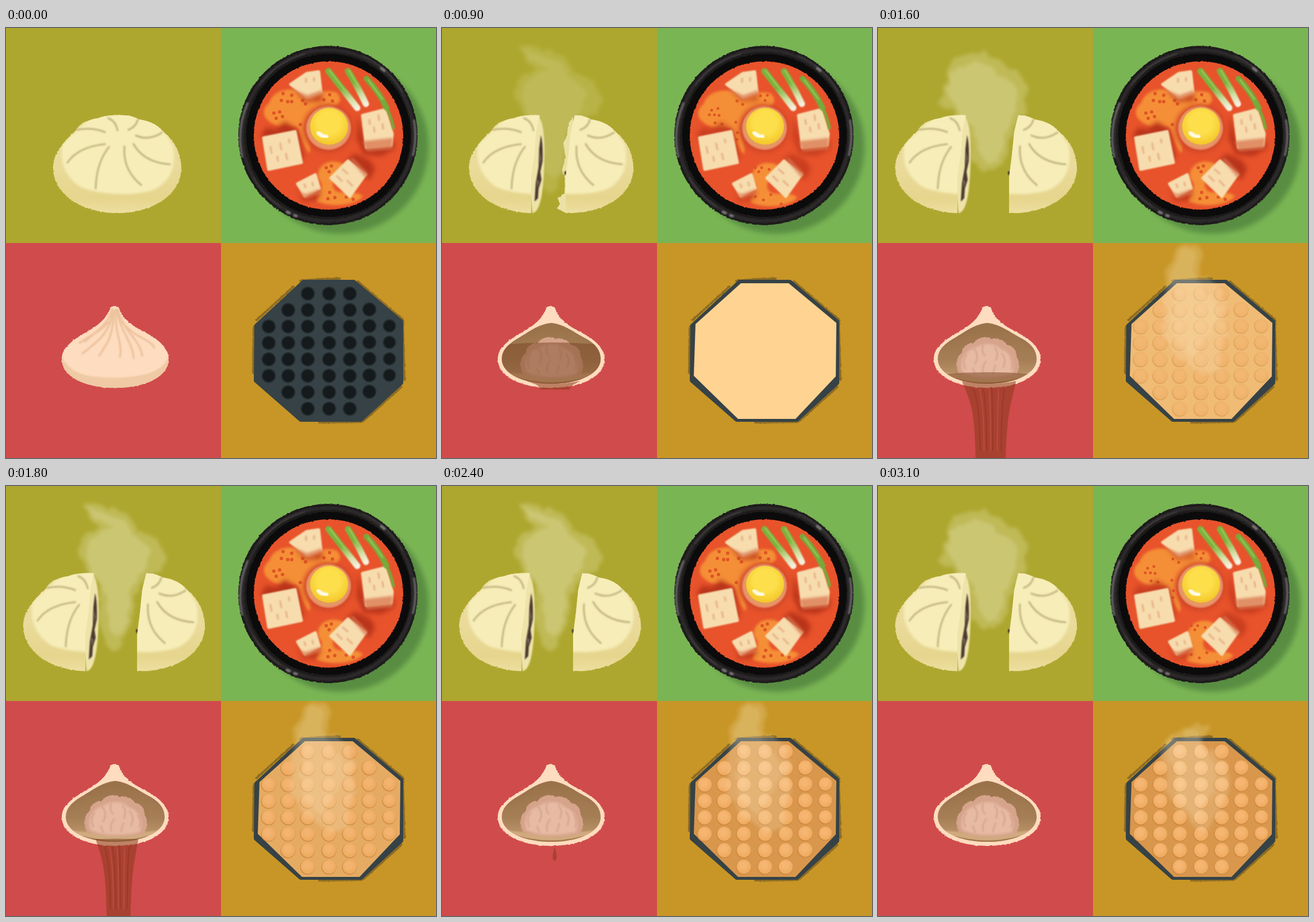
These frames come from a looping animation (748x748 px, 3.2 s). An HTML page:

```html
<!DOCTYPE html>
<html lang="en">
<head>
<meta charset="utf-8">
<title>Four dishes</title>
<style>
html, body { margin: 0; height: 100%; overflow: hidden; }
svg { display: block; width: 100%; height: 100%; }
filter { color-interpolation-filters: sRGB; }
.line { fill: none; stroke-linecap: round; stroke-linejoin: round; }
</style>
</head>
<body>
<svg viewBox="0 0 748 748">
<defs>
  <filter id="rough" x="-10%" y="-10%" width="120%" height="120%">
    <feTurbulence type="fractalNoise" baseFrequency=".25" numOctaves="2" seed="4"/>
    <feDisplacementMap in="SourceGraphic" scale="3" xChannelSelector="R" yChannelSelector="G"/>
    <feGaussianBlur stdDeviation=".6"/>
  </filter>
  <filter id="smoke" x="-20%" y="-20%" width="140%" height="140%">
    <feTurbulence type="fractalNoise" baseFrequency=".05" numOctaves="3" seed="9"/>
    <feDisplacementMap in="SourceGraphic" scale="18" xChannelSelector="R" yChannelSelector="G"/>
    <feGaussianBlur stdDeviation="3"/>
  </filter>
  <filter id="b1" x="-20%" y="-20%" width="140%" height="140%"><feGaussianBlur stdDeviation="1"/></filter>
  <filter id="b2" x="-20%" y="-20%" width="140%" height="140%"><feGaussianBlur stdDeviation="2.2"/></filter>
  <filter id="b4" x="-30%" y="-30%" width="160%" height="160%"><feGaussianBlur stdDeviation="4"/></filter>

  <path id="bunShape" d="M82 243C82 218 100 198 122 178C126 166 148 158 160 157C175 151 195 151 208 152C217 152 226 156 231 159C245 161 262 166 272 179C292 194 305 218 305 243C305 290 255 322 194 322S82 290 82 243Z"/>
  <clipPath id="bunClip"><use href="#bunShape"/></clipPath>
  <clipPath id="leftClip"><path d="M60 130H205V152L199 180 196 220 190 260V330H60Z"/></clipPath>
  <clipPath id="rightClip"><path d="M330 130H203V152L196 180 192 220 187 260V330H330Z"/></clipPath>
  <linearGradient id="bunShade" x1="0" y1="0" x2="0" y2="1">
    <stop offset=".5" stop-color="#eadb9b"/><stop offset=".85" stop-color="#e6d58d"/><stop offset="1" stop-color="#eddfa0"/>
  </linearGradient>
  <g id="bun">
    <use href="#bunShape" fill="url(#bunShade)" filter="url(#rough)"/>
    <g clip-path="url(#bunClip)">
      <path filter="url(#b2)" fill="#f6edb8" d="M98 202C92 240 108 262 130 277C165 291 220 293 255 282C285 270 298 240 290 203L262 160 210 148 150 153Z"/>
      <g class="line" filter="url(#b1)" stroke="#cabe88" stroke-width="3.6">
        <path d="M178 157Q191 162 194 178M124 177Q150 172 172 181M107 234Q125 207 172 202M156 279Q157 235 179 207M206 206Q203 247 235 273M222 202Q240 234 285 237M226 187Q248 197 271 182M213 177Q226 172 229 160"/>
      </g>
    </g>
  </g>

  <path id="cavity" d="M190 513C215 516 230 530 250 540C268 550 276 562 276 576C276 603 235 619 190 619S104 603 104 576C104 562 112 552 130 541C150 530 165 516 190 513Z"/>
  <clipPath id="cavityClip"><use href="#cavity"/></clipPath>
  <linearGradient id="cavityShade" x1="0" y1="0" x2="0" y2="1">
    <stop offset=".1" stop-color="#9c744c"/><stop offset=".6" stop-color="#a57e56"/><stop offset="1" stop-color="#c39c70"/>
  </linearGradient>
  <path id="dumpling" d="M182 486Q189 481 196 486C201 502 216 516 234 525C264 540 283 556 283 575C283 608 240 626 190 626S97 608 97 575C97 556 118 541 143 527C163 516 176 503 182 486Z"/>
  <clipPath id="dumplingClip"><use href="#dumpling"/></clipPath>

  <clipPath id="stewClip"><ellipse cx="561" cy="187" rx="130" ry="129"/></clipPath>
  <linearGradient id="stem" gradientUnits="userSpaceOnUse" x1="580" y1="75" x2="610" y2="140">
    <stop offset=".4" stop-color="#7cb23d"/><stop offset=".75" stop-color="#d3dfa4"/><stop offset="1" stop-color="#f7f0df"/>
  </linearGradient>
  <radialGradient id="yolk" cx=".5" cy=".4" r=".6">
    <stop offset=".5" stop-color="#fddf4b"/><stop offset="1" stop-color="#f4c728"/>
  </radialGradient>
  <radialGradient id="ballShade" cx=".45" cy=".4">
    <stop offset=".4" stop-color="#f5b672"/><stop offset="1" stop-color="#f0ac62"/>
  </radialGradient>
</defs>

<path fill="#aea72f" d="M0 0h375v375H0z"/>
<path fill="#7ab554" d="M374 0h374v375H374z"/>
<path fill="#d04b4c" d="M0 374h375v374H0z"/>
<path fill="#c89626" d="M374 374h374v374H374z"/>

<!-- Steamed bun -->
<g id="bunSteam" fill="#e6e4b4" filter="url(#smoke)">
  <g id="steamA">
    <path opacity=".3" d="M120 85C118 62 140 42 165 42C190 36 212 55 222 70C255 75 268 100 256 122C268 150 235 165 232 185C235 215 218 240 192 248C165 252 155 225 160 190C140 175 138 155 128 140C105 142 96 125 110 112C120 105 116 95 120 85Z"/>
    <path opacity=".3" d="M122 85C135 55 190 50 207 80C240 85 250 120 238 145C215 180 225 210 205 232C180 240 164 205 170 180C150 160 115 125 122 85Z"/>
  </g>
  <g id="steamB">
    <path opacity=".3" d="M138 32C155 25 165 42 190 40C212 45 220 60 226 78C258 80 282 105 276 130C270 152 238 155 228 180C222 205 226 230 210 250C205 270 202 285 190 287C172 285 172 265 166 250C155 225 165 200 162 175C145 152 126 130 128 105C130 85 150 75 165 70C150 62 138 52 138 32Z"/>
    <path opacity=".3" d="M142 36C165 46 195 45 208 66C218 85 252 100 250 125C245 152 212 165 215 190C220 215 205 245 192 265C176 245 172 220 176 190C155 160 132 125 142 100C155 85 175 85 182 72C165 62 148 55 142 36Z"/>
  </g>
</g>
<use id="whole" href="#bun"/>
<g id="left">
  <g filter="url(#b1)">
    <path fill="#eee3a9" d="M200 152C213 158 214 200 213 232C212 280 207 321 192 322L186 260 192 180Z"/>
    <path fill="#4b3a30" d="M207 186Q211 200 210 232L206 250 208 264 203 280 202 296 196 302 198 270 203 242 204 210Z"/>
    <path fill="#7b695a" d="M205 215l3 12-2 12zM200 264l4 3-3 12z"/>
  </g>
  <use href="#bun" clip-path="url(#leftClip)"/>
</g>
<g id="right">
  <path id="tear" fill="#ece1a5" filter="url(#rough)" d="M200 154Q188 170 190 188L183 200 187 225 181 246 186 262 185 288 173 296 177 306 172 314 188 322H200Z"/>
  <path fill="#4b3a30" filter="url(#b1)" d="M185 249l7 1-1 7-6-2z"/>
  <use href="#bun" clip-path="url(#rightClip)"/>
</g>

<!-- Stew -->
<ellipse cx="582" cy="206" rx="153" ry="152" fill="#4d7f3c" opacity=".72" filter="url(#b4)"/>
<g filter="url(#rough)">
  <ellipse cx="560" cy="187" rx="156" ry="156" fill="#1e1b1b"/>
  <ellipse cx="560" cy="187" rx="149" ry="149" fill="none" stroke="#2b2829" stroke-width="6"/>
  <ellipse cx="561" cy="187" rx="136" ry="135" fill="none" stroke="#0c0b0b" stroke-width="14"/>
  <ellipse cx="561" cy="187" rx="130" ry="129" fill="#e8532b"/>
</g>
<g class="line" filter="url(#b1)" stroke="#777476">
  <path stroke-width="4" opacity=".75" d="M411 224A151 151 0 0 1 420 131M710 161A151 151 0 0 1 708 221"/>
  <path stroke-width="5" d="M489 320l4 2M502 326l3 1M653 70l5 4"/>
  <path stroke-width="2" opacity=".3" d="M440 100A148 148 0 0 1 520 45M620 48A148 148 0 0 1 690 112M430 260A148 148 0 0 0 478 311"/>
</g>
<g clip-path="url(#stewClip)">
  <g id="foam" fill="#f58f37" filter="url(#b2)">
    <path d="M458 130C465 108 490 104 510 108C528 125 545 104 575 112C588 125 578 138 560 138C535 140 525 152 524 178C525 195 532 205 528 218C516 206 512 180 505 172C485 170 470 175 455 160C446 152 446 140 458 130Z"/>
    <path d="M552 238C562 229 590 231 590 244C575 258 560 270 574 284C595 290 610 282 621 293C606 310 565 312 541 302C535 290 552 286 549 270C540 260 540 248 552 238Z"/>
  </g>
  <g class="line" stroke="#df5525" stroke-width="6">
    <path id="dotsA" d="M482 114h0M490 128h0M479 126h0M497 117h0M466 148h0M476 146h0M481 154h0M470 157h0M497 128h0M516 126h0M521 132h0M553 125h0M563 116h0M568 127h0M512 168h0M557 243h0M566 240h0M562 250h0M563 286h0M572 295h0M560 297h0M592 294h0M604 298h0"/>
    <path id="dotsB" stroke-width="5" d="M469 143h0M480 140h0M465 151h0M482 152h0M474 151h0M475 165h0M487 167h0M513 127h0M523 133h0M554 118h0M566 117h0M562 126h0M511 164h0M514 182h0M513 194h0M545 243h0M556 243h0M551 250h0M569 246h0M545 293h0M559 299h0M572 290h0M590 306h0"/>
  </g>
  <g id="shadows" fill="#b9341a" filter="url(#b4)">
    <path d="M443 188L452 173 470 176 485 163 508 178 518 226 506 234 500 186 450 196Z"/>
    <path d="M498 102l28 22 24-9-1 11-28 2z"/>
    <path d="M612 152l-2 40 12 28 30 3 24-13-2-16-48 10z"/>
    <path d="M592 232l14-14 28 13 8 14-10 20z"/>
    <path d="M505 272l12 24 32-12-8 15-26 2z"/>
  </g>
  <ellipse cx="560" cy="175" rx="43" ry="42" fill="#cf4526" filter="url(#b4)"/>
  <g filter="url(#b1)" fill="#f7dcae" stroke="#f7dcae" stroke-linejoin="round" stroke-width="5">
    <path d="M495 98L523 79 544 76 548 111 524 120Z"/>
    <path d="M448 191L503 180 514 234 457 246Z"/>
    <path d="M620 152L659 142 672 184 670 204 627 208Z"/>
    <path d="M565 261L595 231 625 255 598 293Z"/>
    <path d="M507 271L538 255 545 279 520 292Z"/>
  </g>
  <path fill="#d9764e" opacity=".75" filter="url(#b2)" d="M494 104L524 117 550 108V116L524 126ZM621 197L673 191 672 211 627 215ZM598 228l6-2 26 27-4 8zM509 284l12 5 25-9 1 8-26 9z"/>
  <path class="line" filter="url(#b1)" stroke="#e8b68a" stroke-width="3.5" d="M522 88v6M536 87v5M460 207l2 10M477 201l2 10M492 194l1 5M487 219l2 9M472 224l1 7M632 160l1 7M648 152l1 8M655 167l1 8M640 173l1 7M586 246l8 7M576 258l8 8M594 266l8 8M519 272l2 5M533 269l1 5"/>
  <g class="line" stroke="url(#stem)" stroke-width="11" filter="url(#b1)">
    <path d="M561 75Q582 102 611 139"/><path d="M595 75Q612 102 626 132"/>
    <path stroke="#74ab3a" stroke-width="10" d="M627 88Q647 108 662 139"/>
    <path stroke="#74ab3a" stroke-width="5" d="M660 136Q670 152 674 174"/>
    <path stroke="#a7cf66" stroke-width="2" d="M563 74L590 109M597 74L612 100M630 90L655 124"/>
  </g>
  <ellipse cx="561" cy="174" rx="39" ry="38" fill="#e9906a" filter="url(#b1)"/>
  <ellipse cx="561" cy="173" rx="36" ry="35" fill="#e59a62" filter="url(#b1)"/>
  <ellipse cx="562" cy="171" rx="33" ry="32" fill="url(#yolk)"/>
  <path class="line" filter="url(#b1)" stroke="#fffbe4" stroke-width="7" d="M543 182Q549 189 558 189"/>
</g>

<!-- Soup dumpling -->
<use href="#dumpling" fill="#fedcbf" filter="url(#rough)"/>
<g id="skin" clip-path="url(#dumplingClip)">
  <path fill="#efcaa4" filter="url(#b1)" d="M97 570Q108 600 150 606Q195 612 240 603Q272 596 283 572V630H97Z"/>
  <g class="line" filter="url(#b1)" stroke="#edc39e" stroke-width="3.5">
    <path d="M184 490C178 518 155 528 138 545M186 490C182 530 160 545 133 566M187 492C187 535 176 550 162 570M191 490C188 530 204 550 198 572M193 490C197 525 220 545 222 574M195 490C202 525 232 540 237 570M202 512C225 540 250 540 258 556M178 512C168 525 150 533 128 548"/>
  </g>
</g>
<g id="inside">
  <use href="#cavity" fill="url(#cavityShade)"/>
  <g clip-path="url(#cavityClip)">
    <path fill="#8f6944" opacity=".45" filter="url(#b4)" d="M104 560Q145 520 190 517Q235 520 276 560V548L190 510Z"/>
    <path fill="#d0aa7e" filter="url(#b1)" d="M106 598Q190 610 274 598V622H106Z"/>
    <path fill="#d6a38b" filter="url(#rough)" d="M140 600C132 585 138 570 146 565C146 553 158 547 166 549C172 538 190 534 198 541C208 537 220 543 224 551C236 553 242 562 241 572C248 582 246 598 238 605C215 612 160 612 140 600Z"/>
    <path fill="#e7baa3" filter="url(#b2)" d="M147 598C140 580 152 560 168 557C184 546 205 548 214 559C232 564 240 585 233 602C205 609 165 609 147 598Z"/>
    <path class="line" stroke="#d5a58e" stroke-width="2.5" filter="url(#b1)" d="M154 568q-8 12-2 25M167 558q10 10 2 26M183 552q-4 12 3 18M188 580q-8 9-5 20M203 556q8 10 2 22M215 566q9 10 3 24M230 573q6 10 2 20M165 592l4 10M204 587l-4 14"/>
    <path fill="none" stroke="#a3774d" stroke-width="3" d="M132 610Q190 626 248 610"/>
  </g>
</g>
<g clip-path="url(#cavityClip)"><path id="broth" fill="#7b4526"/></g>
<path id="stream" fill="#8a3a1c" fill-opacity=".55"/>
<path id="dark" class="line" stroke="#86301f" stroke-width="2.5" opacity=".35"/>
<path id="pale" class="line" stroke="#c95a48" stroke-width="2" opacity=".5"/>

<!-- Griddle -->
<path class="line" stroke="#5d4b24" stroke-width="4" opacity=".55" filter="url(#rough)" d="M512 440L545 437 580 436M612 441L690 507 693 612M688 624L620 685 545 686M431 520L430 600M436 508L500 450"/>
<path fill="#364246" stroke="#364246" stroke-width="8" stroke-linejoin="round" d="M518 442L605 442 687 511 687 617 617 681 513 681 435 613 436 518Z"/>
<g id="holes"></g>
<g id="batter">
  <path id="dough" d="M520 444L603 444 686 513 685 606 615 680 515 680 438 605 441 515Z"/>
  <g id="balls"></g>
</g>
<g id="griddleSteam" fill="#fff0d2" filter="url(#smoke)">
  <g id="puffA">
    <path opacity=".2" d="M515 392C525 370 560 370 567 392C568 410 555 418 562 430C590 440 615 470 603 505C608 540 590 560 595 590C575 612 540 592 525 575C500 555 490 530 497 500C490 470 510 455 500 430C500 410 513 405 515 392Z"/>
    <path opacity=".15" d="M527 388C545 375 560 395 545 415C540 440 590 455 592 495C585 530 560 540 550 570C520 560 505 520 515 485C520 455 505 435 512 418Z"/>
  </g>
  <g id="puffB">
    <path opacity=".2" d="M528 424C545 418 560 416 578 417C572 438 560 440 566 452C595 462 618 490 607 525C605 550 585 570 580 590C560 610 545 590 535 570C510 560 492 535 503 505C492 480 488 450 505 440C515 440 520 430 528 424Z"/>
    <path opacity=".15" d="M500 448C520 435 540 440 535 425C555 420 570 425 560 445C585 470 595 500 585 525C575 555 560 560 555 580C530 560 515 540 520 510C515 485 500 470 500 448Z"/>
  </g>
</g>
</svg>
<script>
const $ = id => document.getElementById(id);
const clamp = v => Math.max(0, Math.min(1, v));
const fade = (id, v) => $(id).setAttribute('opacity', clamp(v));
const draw = (id, d) => $(id).setAttribute('d', d);

const cols = [457, 491, 525, 562, 598, 632, 667];
const circle = (x, y, r, fill) => `<circle cx="${x}" cy="${y}" r="${r}" fill="${fill}"/>`;
let holes = '', balls = '';
[3, 5, 7, 7, 7, 7, 5, 3].forEach((count, row) => {
  const y = 462 + row * 28.6, skip = (7 - count) / 2;
  cols.slice(skip, 7 - skip).forEach((x, i) => {
    const r = i + skip === 6 ? 11.5 : 12.3, dy = i + skip > 4 ? -1 : 0;
    holes += circle(x, y + dy, r, '#232c2f') + circle(x, y + dy, r - 2, '#151a1c');
    balls += circle(x - .5, y + dy + .8, r + .8, '#cd883f') + circle(x, y + dy, r, 'url(#ballShade)');
  });
});
$('holes').innerHTML = holes;
$('balls').innerHTML = balls;

const mix = (a, b, k) => `rgb(${a.map((v, i) => Math.round(v + (b[i] - v) * k))})`;

function drawBun(s) {
  const open = Math.min(s, 7);
  fade('whole', s === 0);
  fade('left', s > 0);
  fade('right', s > 0);
  $('left').setAttribute('transform', `translate(${open ? -1 - (open - 1) * 8.5 : 0})`);
  $('right').setAttribute('transform', `translate(${open ? 2 + (open - 1) * 6.5 : 0})`);
  fade('tear', s > 1 ? (7 - s) / 2 : 0);
  fade('bunSteam', (s - 2) / 5);
  fade('steamA', [1, .5, 0][s % 3]);
  fade('steamB', [0, .5, 1][s % 3]);
}

function drawStew(s) {
  const odd = s % 2;
  fade('dotsA', !odd);
  fade('dotsB', odd);
  fade('shadows', odd ? .65 : 1);
  $('foam').setAttribute('transform', odd ? 'translate(-3 2)' : '');
}

function drawDumpling(s) {
  const inside = s ? clamp(.4 + (s - 1) * .2) : 0;
  fade('inside', inside);
  fade('skin', 1 - inside);
  const level = 548 + Math.max(0, s - 5) * 7.4;
  draw('broth', `M100 ${level + 3}Q190 ${level - 5} 280 ${level + 3}V630H100Z`);
  fade('broth', s > 1 && s < 17 ? Math.min(.52, (s - 1) * .13) : 0);
  drawStream(s);
}

function drawStream(s) {
  let d = '', dark = '', pale = '';
  if (s >= 5 && s <= 18) {
    const w = s < 13 ? 1 : 1 - (s - 12) * .105;
    const end = { 5: 629, 6: 685, 17: 697, 18: 652 }[s] || 760;
    const foot = s > 16 ? 3 : 26 * w;
    const a = 616 + (end - 616) * .25, b = 616 + (end - 616) * .3;
    d = `M${193 - 47 * w} 614Q193 624 ${193 + 47 * w} 614C${193 + 40 * w} ${a} ${196 + 28 * w} ${b} ${196 + foot} ${end}` +
        `H${196 - foot}C${193 - 24 * w} ${b} ${193 - 32 * w} ${a} ${193 - 47 * w} 614Z`;
    if (s === 17) d += 'M198 710L201 760H195Z';
    if (s === 18) d += 'M198 690L200 735H196Z';
    if (s > 6) {
      const streak = k => `M${193 + 34 * w * k} 628Q${196 + 24 * w * k} 650 ${196 + 23 * w * k} ${Math.min(end - 25, 760)}`;
      dark = [-.8, -.3, .15, .8].map(streak).join('');
      pale = [-.5, 0, .5].map(streak).join('');
    }
  } else if (s > 18 && s % 4 < 3) {
    const y = [628, 664, 712][s % 4];
    d = `M196 ${y}Q203 ${y + 23} 196 ${y + 24}Q189 ${y + 23} 196 ${y}Z`;
  }
  draw('stream', d);
  draw('dark', dark);
  draw('pale', pale);
}

function drawGriddle(s) {
  const bake = clamp((s - 9) / 7.5);
  fade('batter', s / 5);
  $('dough').setAttribute('fill', mix([255, 211, 145], [216, 151, 76], bake));
  fade('balls', bake * 1.3);
  fade('griddleSteam', (s - 8) / 4);
  fade('puffA', s % 2 === 0);
  fade('puffB', s % 2);
}

let last = -1;
function tick() {
  const t = performance.now() % 3200;
  const step = t < 500 ? 0 : Math.floor((t - 400) / 100);
  if (step !== last) {
    last = step;
    [drawBun, drawStew, drawDumpling, drawGriddle].forEach(part => part(step));
  }
  requestAnimationFrame(tick);
}
tick();
</script>
</body>
</html>
```
